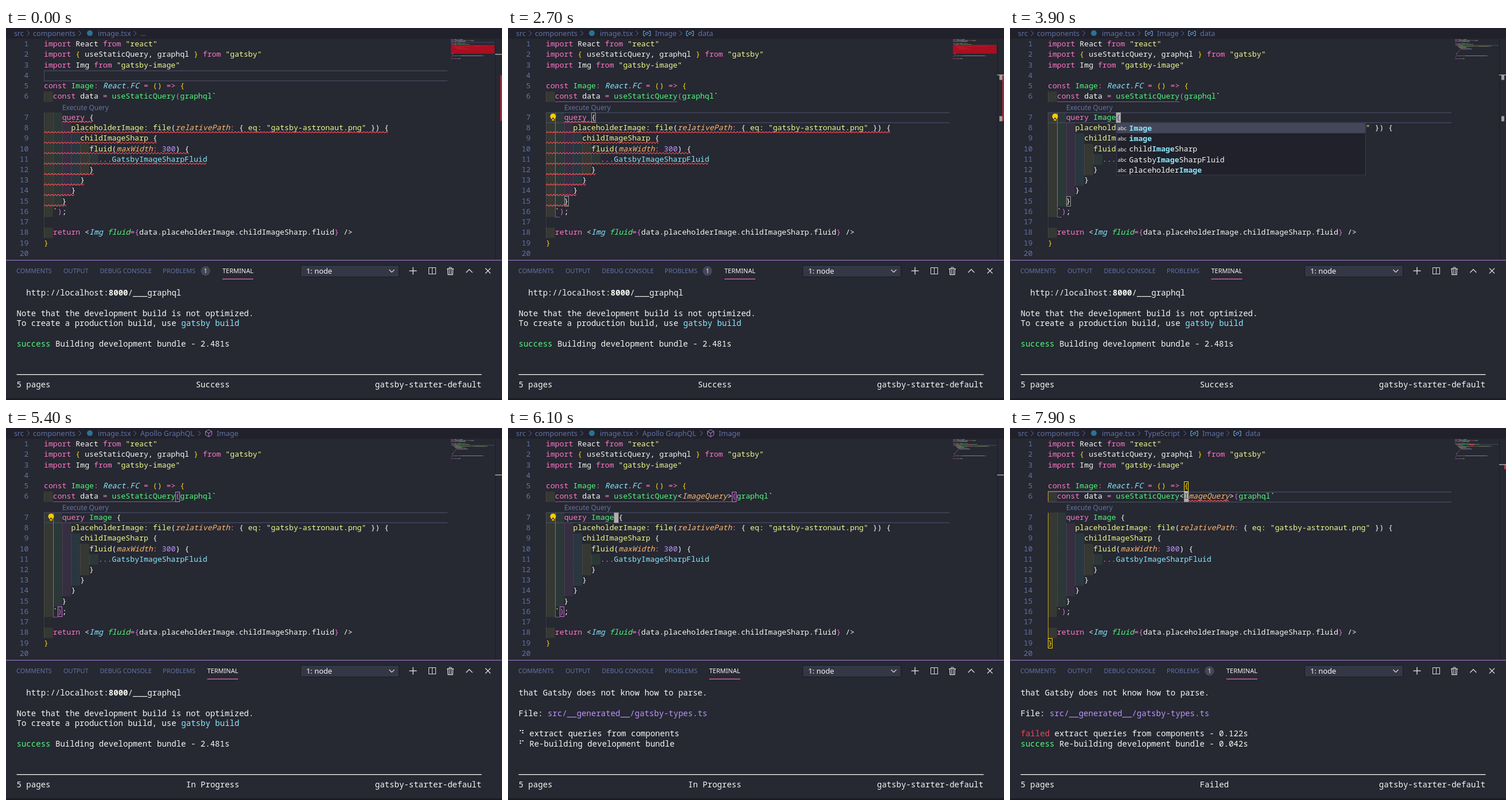
An HTML page with a canvas that plays this animation: 864 px wide and 648 px high, repeating every 8 s.

```html
<!DOCTYPE html>
<html lang="en">
<head>
<meta charset="utf-8">
<title>Typed queries in the editor</title>
<style>
html, body { margin: 0; width: 100%; height: 100%; overflow: hidden; background: #262832; }
canvas { display: block; }
</style>
</head>
<body>
<canvas id="stage" width="864" height="648"></canvas>
<script>
const ctx = document.getElementById("stage").getContext("2d");
const LOOP = 8000;
const MONO = '"Noto Sans Mono", "DejaVu Sans Mono", monospace';
const SANS = '"Noto Sans", "Open Sans", sans-serif';
const BG = "#262832", DARK = "#20212b", SLATE = "#6272a4", WHITE = "#f8f8f2", LINE = "#44475a";
const RED = "#ff4a55", ORCHID = "#da70d6", GOLD = "#ffd700", PINK = "#ff79c6";
const CODE = { x: 66, size: 13.18, pitch: 7.908, row: 18.23 };
const TERM = { x: 18.5, size: 14.06, pitch: 8.436, row: 17.72 };

// Text markup: "~" starts a run, the next letter picks its ink.
const INK = {
  p: PINK, w: WHITE, y: "#f1fa8c", g: "#50fa7b", c: "#8be9fd", o: ORCHID, d: GOLD, v: "#bd93f9",
  s: SLATE, r: "#ee4656", b: WHITE, B: "#8be9fd", C: "#8be9fd", G: "#50fa7b", O: "#ffb86c"
};
const runs = src => src.split("~").slice(1).map(s => ({ ink: s[0], text: s.slice(1) }));
const plain = src => runs(src).map(r => r.text).join("");
const fontFor = (ink, size) =>
  ("CGO".includes(ink) ? "italic " : "") + ("bB".includes(ink) ? "bold " : "") + size + "px " + MONO;

const colX = col => CODE.x + col * CODE.pitch;
const rowY = n => 19.5 + CODE.row * (n > 6 ? n : n - 1);   // a lens row follows line 6
const rulerY = n => 18.5 + 9 * (n > 6 ? n : n - 1);
const at = (t, steps) => steps.filter(s => t >= s[0]).pop()[1];
const within = (t, ...spans) => spans.some(([a, b]) => t >= a && t < b);

function rect(x, y, w, h, color) {
  ctx.fillStyle = color;
  ctx.fillRect(x, y, w, h);
}
function path(points, color, width = 1) {
  ctx.beginPath();
  points.forEach(([x, y], i) => i ? ctx.lineTo(x, y) : ctx.moveTo(x, y));
  ctx.strokeStyle = color;
  ctx.lineWidth = width;
  ctx.stroke();
}
function frame(x, y, w, h, color) {
  ctx.strokeStyle = color;
  ctx.lineWidth = 1;
  ctx.strokeRect(Math.round(x) + .5, Math.round(y) + .5, w, h);
}
function disc(x, y, r, color) {
  ctx.beginPath();
  ctx.arc(x, y, r, 0, 7);
  ctx.fillStyle = color;
  ctx.fill();
}
function label(text, x, y, size, color, family = SANS) {
  ctx.font = size + "px " + family;
  ctx.fillStyle = color;
  ctx.fillText(text, x, y);
}
function mono(src, x, y, grid) {
  let col = 0;
  for (const { ink, text } of runs(src)) {
    ctx.font = fontFor(ink, grid.size);
    ctx.fillStyle = INK[ink];
    ctx.fillText(text, x + col * grid.pitch, y);
    col += text.length;
  }
}

function source(s) {
  const generic = s.generic ? "~w<~OImageQuery~w>" : "";
  return [
    '~pimport ~wReact ~pfrom ~y"react"',
    '~pimport ~d{ ~wuseStaticQuery, graphql ~d} ~pfrom ~y"gatsby"',
    '~pimport ~wImg ~pfrom ~y"gatsby-image"',
    "",
    "~pconst ~gImage~p: ~CReact.FC ~p= ~d() ~p=> ~d{",
    "~w  ~pconst ~wdata ~p= ~guseStaticQuery" + generic + "~o(~ggraphql~y`",
    "~w    ~pquery ~g" + s.name + "~w{",
    '~w      ~yplaceholderImage: file~w(~OrelativePath~p: ~w{ ~yeq: "gatsby-astronaut.png" ~w}) {',
    "~w        ~ychildImageSharp ~w{",
    "~w          ~yfluid~w(~OmaxWidth~p: ~v300~w) {",
    "~w            ~p...~cGatsbyImageSharpFluid",
    "~w          }", "~w        }", "~w      }", "~w    }",
    "~w  ~y`~o)~w;",
    "",
    "~w  ~preturn ~w<~CImg ~Gfluid~p=~o{~wdata.placeholderImage.childImageSharp.fluid~o} ~w/>",
    "~d}",
    "",
    "~pexport default ~wImage"
  ];
}

const BUNDLED = "~gsuccess~w Building development bundle - 2.481s";
const EXTRACTED = "~gsuccess~w extract queries from components - 0.040s";
const INSERTED = [
  "~sverbose~w [typegen] Generate type definitions to",
  "~sverbose~w [typegen] Insert type definitions into",
  "~w/home/oakriver/Workspace/tmp/gatsby-typegen-test-2/src/components/image.tsx"
];
const REBUILDING = "~w⠋ Re-building development bundle";
const REBUILT = "~gsuccess~w Re-building development bundle - 0.042s";
const EXTRACTING = "~w⠙ extract queries from components";
const RAN = "~gsuccess~w run queries - 0.031s - 1/1";
const FILE = "~wFile: ~vsrc/__generated__/gatsby-types.ts";
const LOGS = [
  [0, ["~w  http://localhost:~b8000~w/___graphql", "", "~wNote that the development build is not optimized.",
    "~wTo create a production build, use ~cgatsby build", "", BUNDLED]],
  [5600, ["~wTo create a production build, use ~cgatsby build", "", BUNDLED, EXTRACTED, ...INSERTED.slice(0, 1), REBUILDING]],
  [5700, [EXTRACTED, ...INSERTED, REBUILDING, "~w[" + " ".repeat(28) + "]   0.005 s 0/1 0% run queries"]],
  [5800, [EXTRACTED, ...INSERTED, RAN, REBUILDING]],
  [5900, [...INSERTED, RAN, REBUILDING, EXTRACTING]],
  [6000, [...INSERTED, RAN, REBUILDING, "~w⠹ extract queries from components"]],
  [6100, ["~wthat Gatsby does not know how to parse.", "", FILE, "", EXTRACTING, REBUILDING]],
  [6200, ["~wthat Gatsby does not know how to parse.", "", FILE, "",
    "~rfailed~w extract queries from components - 0.122s", REBUILT]]
];

function stateAt(t) {
  const [line, col] = at(t, [[0, [4, 0]], [1600, [7, 4]], [2200, [7, 10]], [3300, [7, 11]], [3500, [7, 12]],
    [3600, [7, 13]], [3800, [7, 14]], [3900, [7, 15]], [4200, [7, 16]], [4600, [7, 15]],
    [6800, [6, 15]], [7500, [6, 29]], [7800, [6, 30]]]);
  return {
    line, col,
    cursor: within(t, [100, 600], [1200, 2700], [3300, 5100], [5600, 6600], [6800, 7200], [7500, 8000]),
    name: t < 3300 ? "" : t < 4200 ? "Image".slice(0, col - 10) : "Image ",
    generic: t >= 5900,
    queryError: t < 3300,
    typeError: t >= 6200,
    crumbs: at(t, [[0, "short"], [1900, "symbol"], [4200, "graphql"], [7000, "type"]]),
    bulb: within(t, [2000, 7000]),
    braces: within(t, [2200, 4600]),
    parenScope: within(t, [1700, 6800]),
    popup: within(t, [3500, 4200]),
    wordMark: within(t, [7000, 7500], [7600, 7800]),
    log: at(t, LOGS),
    status: at(t, [[0, "Success"], [5400, "In Progress"], [7200, "Failed"]])
  };
}

function symbolIcon(x) {
  const c = "#75beff";
  path([[x - 3, 5.5], [x - 6, 5.5], [x - 6, 13.5], [x - 3, 13.5]], c);
  path([[x + 3, 5.5], [x + 6, 5.5], [x + 6, 13.5], [x + 3, 13.5]], c);
  path([[x - 3, 9.5], [x + 1, 7], [x + 3, 9], [x - 1, 12], [x - 3, 9.5]], c);
}
function cubeIcon(x) {
  const c = "#b180d7";
  path([[x, 3], [x + 5.5, 6], [x + 5.5, 12], [x, 15.5], [x - 5.5, 12], [x - 5.5, 6], [x, 3]], c);
  path([[x - 5.5, 6], [x, 9], [x + 5.5, 6]], c);
  path([[x, 9], [x, 15]], c);
}
function breadcrumbs(kind) {
  rect(0, 0, 864, 18.5, DARK);
  const word = (text, x) => label(text, x, 13.8, 12.6, SLATE);
  const arrow = x => path([[x - 2.5, 5], [x + 2, 9.3], [x - 2.5, 13.6]], SLATE);
  word("src", 14); arrow(39); word("components", 47); arrow(129);
  disc(146, 9, 5, "#2a7298");
  word("image.tsx", 160); arrow(225);
  const symbols = x => {
    symbolIcon(x + 8); word("Image", x + 22); arrow(x + 67);
    symbolIcon(x + 83); word("data", x + 97);
  };
  if (kind === "short") word("…", 234);
  if (kind === "symbol") symbols(234);
  if (kind === "graphql") { word("Apollo GraphQL", 234); arrow(337); cubeIcon(353); word("Image", 367); }
  if (kind === "type") { word("TypeScript", 234); arrow(305); symbols(313); }
}

function squiggle(n, from, to) {
  const points = [], y = rowY(n) + 16.3;
  for (let x = colX(from), i = 0; x <= colX(to); x += 2.8, i++) points.push([x, y + (i % 2 ? -1.2 : 1.2)]);
  path(points, RED, 1.1);
}
const bracketBox = (n, col, color) => frame(colX(col), rowY(n) + .3, 7, 17, color);

function indentation(lines) {
  const tints = ["255,255,64", "127,255,127", "255,127,255", "79,236,236"];
  for (let n = 6; n <= 18; n++) {
    const depth = plain(lines[n - 1]).search(/\S/) / 2;
    for (let k = 0; k < depth; k++) {
      rect(colX(2 * k), rowY(n), 2 * CODE.pitch, CODE.row, `rgba(${tints[k % 4]},.075)`);
      rect(Math.round(colX(2 * k)), rowY(n), 1, CODE.row, "rgba(255,255,255,.09)");
    }
    if (n === 17) rect(66, rowY(n), 1, CODE.row, "rgba(255,255,255,.09)");
  }
}

function scopes(s, lines) {
  if (s.parenScope) {
    const tone = "rgba(218,112,214,.6)", open = plain(lines[5]).indexOf("(");
    path([[82, 128.5], [colX(open), 128.5]], tone);
    path([[82.5, 148], [82.5, 329.5], [90, 329.5]], tone);
    if (!s.braces) { bracketBox(6, open, ORCHID); bracketBox(16, 3, ORCHID); }
  }
  if (s.line === 6) {
    const tone = "rgba(255,215,0,.65)";
    path([[colX(30), 110.5], [66.5, 110.5], [66.5, 128.5]], tone);
    path([[66.5, 148], [66.5, 366]], tone);
    bracketBox(5, 30, GOLD);
    bracketBox(19, 0, GOLD);
  }
  if (s.braces) {
    bracketBox(7, plain(lines[6]).indexOf("{"), "#999b98");
    bracketBox(15, 4, "#999b98");
  }
}

function editor(s, lines) {
  const top = Math.round(rowY(s.line)) + .5;
  indentation(lines);
  path([[769, top], [66.5, top], [66.5, top + 17.5], [769, top + 17.5]], LINE, 1.4);
  if (s.wordMark) for (const [n, col] of [[2, 9], [6, 15]])
    rect(colX(col), rowY(n), 14 * CODE.pitch, CODE.row, "rgba(139,233,253,.3)");
  for (let n = 1; n <= 20; n++) {
    const num = String(n);
    label(num, 39.5 - num.length * CODE.pitch, rowY(n) + 12.7, CODE.size, SLATE, MONO);
    mono(lines[n - 1], CODE.x, rowY(n) + 12.7, CODE);
  }
  label("Execute Query", 98, 143, 11.9, SLATE);
  scopes(s, lines);
  if (s.queryError) for (let n = 7; n <= 15; n++)
    squiggle(n, n === 7 ? 4 : 0, plain(lines[n - 1]).length);
  if (s.typeError) squiggle(6, 30, 40);
  if (s.bulb) {
    disc(78.5, 154, 5, "#ffcc00");
    rect(76.5, 157, 4, 4.5, "#e0b400");
    rect(77.5, 156, 2, 3, BG);
  }
  if (s.cursor) {
    const char = plain(lines[s.line - 1])[s.col] || " ";
    rect(colX(s.col), rowY(s.line) + .3, CODE.pitch, 17.8, "#aeafad");
    label(char, colX(s.col), rowY(s.line) + 12.7, CODE.size, "#4a4b50", MONO);
  }
}

function popup(s) {
  const x = colX(s.col), y = 165, row = 18.3, hit = s.name;
  const words = ["Image", "image", "childImageSharp", "GatsbyImageSharpFluid", "placeholderImage"];
  if (hit.length < 3) words.splice(2, 0, "Img", "import", "imports", "implements");
  rect(x, y, 434, row * words.length, DARK);
  rect(x, y, 434, row, LINE);
  frame(x, y, 434, row * words.length - 1, "#3b3d4b");
  words.forEach((word, i) => {
    const base = y + row * i + 13.6, k = word.toLowerCase().indexOf(hit.toLowerCase());
    label("abc", x + 3, base - .5, 9.3, WHITE);
    mono("~w" + word.slice(0, k) + "~B" + word.slice(k, k + hit.length) + "~w" + word.slice(k + hit.length),
      x + 23, base, CODE);
  });
}

function minimap(s, lines) {
  const y = n => 19.5 + (n - 1) * 1.66;
  rect(775, y(s.line), 76, 1.4, "rgba(98,114,164,.35)");
  if (s.queryError) rect(775, y(7), 76, 15.2, "#a80f20");
  ctx.globalAlpha = .6;
  lines.forEach((src, i) => {
    let col = 0;
    for (const { ink, text } of runs(src)) {
      const red = s.queryError && i > 5 && i < 15;
      for (const ch of text) {
        if (ch !== " ") rect(775 + col * .84, y(i + 1) + .2, .7, 1, red ? "#e03040" : INK[ink]);
        col++;
      }
    }
  });
  ctx.globalAlpha = 1;
  if (s.typeError) rect(800, y(6), 9, 1.6, RED);

  rect(852, 18.5, 1, 386, "rgba(0,0,0,.2)");
  if (s.queryError) rect(861, 82, 3, 80, "#a82838");
  if (s.typeError) rect(861, 63, 3, 9, "#c93444");
  if (s.braces) for (const n of [7, 15]) rect(856, rulerY(n), 5, 9, "#a0a09c");
  if (s.wordMark) for (const n of [2, 6]) rect(856, rulerY(n), 5, 9, "#7a7b80");
  rect(852, rulerY(s.line) - .5, 12, 1.5, "#a5a6a3");
}

function toolbar() {
  rect(513, 413, 172, 21, "#343746");
  frame(513, 413, 171, 20, "#1b1c24");
  label("1: node", 523, 428, 12.9, WHITE);
  const ink = "#dcdcd8";
  path([[667.5, 421], [672, 425.5], [676.5, 421]], ink, 1.2);
  path([[702.5, 423], [715.5, 423]], ink, 1.4);
  path([[709, 416.5], [709, 429.5]], ink, 1.4);
  frame(736, 417, 12, 11, ink);
  path([[742.5, 417], [742.5, 429]], ink);
  path([[768, 419.5], [780, 419.5]], ink, 1.3);
  path([[772, 419], [772, 417], [776, 417], [776, 419]], ink);
  path([[769.5, 420], [770, 429.5], [778, 429.5], [778.5, 420]], ink, 1.3);
  path([[772.5, 421], [772.5, 428]], ink);
  path([[775.5, 421], [775.5, 428]], ink);
  path([[801.5, 426], [807, 420.5], [812.5, 426]], ink, 1.3);
  path([[835, 418.5], [844, 427.5]], ink, 1.3);
  path([[844, 418.5], [835, 427.5]], ink, 1.3);
}

function panel(s) {
  rect(0, 404, 864, 1, "#a882dc");
  const badge = s.queryError || s.typeError, active = badge ? 377 : 350.5;
  const tab = (text, x, color = SLATE) => label(text, x, 427, 11, color);
  tab("COMMENTS", 18); tab("OUTPUT", 100); tab("DEBUG CONSOLE", 163.5); tab("PROBLEMS", 273);
  tab("TERMINAL", active, WHITE);
  rect(active, 436.7, 54, 1.1, PINK);
  if (badge) {
    disc(347.5, 423.2, 8.2, LINE);
    label("1", 344.7, 426.8, 10, WHITE);
  }
  toolbar();
  const print = (src, row, col = 0) =>
    mono(src, TERM.x + col * TERM.pitch, 466.3 + row * TERM.row, TERM);
  s.log.forEach((src, row) => print(src, row));
  rect(18.5, 603, 810, 1.3, WHITE);
  print("~w5 pages", 9);
  print("~w" + s.status, 9, Math.floor((81 - s.status.length) / 2));
  print("~wgatsby-starter-default", 9, 74);
  rect(0, 645, 864, 3, "#1c1c25");
}

function draw(t) {
  const s = stateAt(t), lines = source(s);
  rect(0, 0, 864, 648, BG);
  editor(s, lines);
  minimap(s, lines);
  if (s.popup) popup(s);
  breadcrumbs(s.crumbs);
  panel(s);
}

const start = performance.now();
function tick() {
  draw((performance.now() - start) % LOOP);
  requestAnimationFrame(tick);
}
tick();
</script>
</body>
</html>
```
